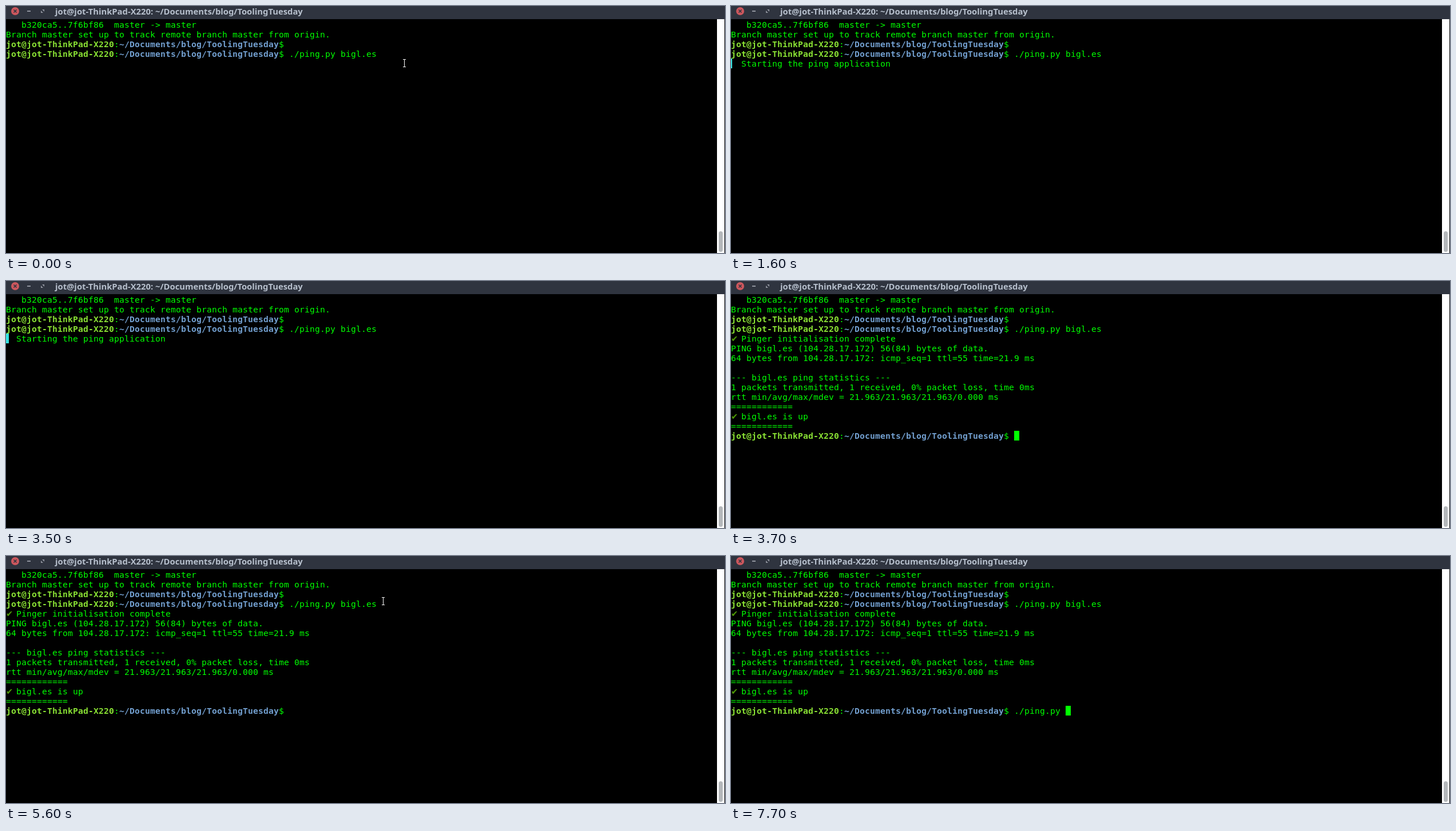
An HTML page with a canvas that plays this animation: 1257x432 px, repeating every 8 s.

```html
<!DOCTYPE html>
<html lang="en">
<head>
<meta charset="utf-8">
<title>Terminal</title>
<style>
  html, body { margin: 0; width: 100%; height: 100%; overflow: hidden; background: #000; }
  canvas { display: block; }
</style>
</head>
<body>
<canvas width="1257" height="432"></canvas>
<script>
const ctx = document.querySelector('canvas').getContext('2d');
const COL = 9, ROW = 17, TOP = 24, LOOP = 8000;
const MONO = '14.67px "DejaVu Sans Mono", monospace';
const GREEN = '#00ff00', USER = '#8ae234', PATH = '#729fcf', CHECK = '#4e9a06', SPIN = '#34e2e2';
const HOST = 'jot@jot-ThinkPad-X220', DIR = '~/Documents/blog/ToolingTuesday';
const COMMAND = './ping.py bigl.es', INPUT_COL = 55;

const OUTPUT = [
  '  Pinger initialisation complete',
  'PING bigl.es (104.28.17.172) 56(84) bytes of data.',
  '64 bytes from 104.28.17.172: icmp_seq=1 ttl=55 time=21.9 ms',
  '',
  '--- bigl.es ping statistics ---',
  '1 packets transmitted, 1 received, 0% packet loss, time 0ms',
  'rtt min/avg/max/mdev = 21.963/21.963/21.963/0.000 ms',
  '============',
  '  bigl.es is up',
  '============'
];

function rect(x, y, w, h, color) {
  ctx.fillStyle = color;
  ctx.fillRect(x, y, w, h);
}

function shape(color, points) {
  ctx.fillStyle = color;
  ctx.beginPath();
  points.forEach(([x, y]) => ctx.lineTo(x, y));
  ctx.fill();
}

// Every character sits in its own terminal cell.
function print(row, col, text, color = GREEN, bold = false) {
  ctx.font = (bold ? 'bold ' : '') + MONO;
  ctx.fillStyle = color;
  [...text].forEach((ch, i) => ctx.fillText(ch, (col + i) * COL, TOP + row * ROW + 14));
}

function prompt(row, input = '') {
  print(row, 0, HOST, USER, true);
  print(row, 21, ':');
  print(row, 22, DIR, PATH, true);
  print(row, 53, '$ ' + input);
}

function block(row, col, width = COL, color = GREEN) {
  rect(col * COL, TOP + row * ROW, width, ROW, color);
}

function check(row) {
  ctx.font = '14.67px "DejaVu Sans", sans-serif';
  ctx.fillStyle = CHECK;
  ctx.fillText('✔', 0, TOP + row * ROW + 14);
}

function windowFrame() {
  rect(0, 0, 1257, 432, '#000');
  rect(0, 0, 1257, 23, '#2f343f');
  ctx.fillStyle = '#cc575d';
  ctx.beginPath();
  ctx.arc(16, 9, 7, 0, 7);
  ctx.fill();
  ctx.strokeStyle = '#2f343f';
  ctx.lineWidth = 1.6;
  ctx.beginPath();
  ctx.moveTo(13.5, 6.5); ctx.lineTo(18.5, 11.5);
  ctx.moveTo(18.5, 6.5); ctx.lineTo(13.5, 11.5);
  ctx.stroke();
  rect(37, 8, 6, 2, '#90949e');
  shape('#90949e', [[63, 6], [67, 6], [67, 10]]);
  shape('#90949e', [[61, 8], [61, 12], [65, 12]]);
  ctx.font = 'bold 14.8px "Noto Sans", "Open Sans", sans-serif';
  ctx.fillStyle = '#b6bfcc';
  ctx.fillText(`${HOST}: ${DIR}`, 86, 15);
  rect(1243, 23, 13, 409, '#fff');
  ctx.fillStyle = '#b4b7ba';
  ctx.beginPath();
  ctx.roundRect(1246, 394, 7, 36, 3.5);
  ctx.fill();
}

function pointer(x, y) {
  x = Math.round(x);
  y = Math.round(y);
  rect(x - 3, y - 8, 7, 3, '#000');
  rect(x - 3, y + 5, 7, 3, '#000');
  rect(x - 1, y - 7, 3, 14, '#000');
  rect(x - 2, y - 7, 5, 1, '#fff');
  rect(x - 2, y + 6, 5, 1, '#fff');
  rect(x, y - 7, 1, 14, '#fff');
}

function glide(t, start, [x0, y0], [x1, y1]) {
  const p = Math.min(1, (t - start) / 400), e = p * p * (3 - 2 * p);
  pointer(x0 + (x1 - x0) * e, y0 + (y1 - y0) * e);
}

function startup(t) {
  if (t < 1400) {
    if (t >= 500 && t < 1100) block(3, 72);
    pointer(696, 100);
  } else if (t < 1500) {
    block(4, 0);
  } else {
    // The bar grows from 1 to 7 pixels and shrinks again, one step per 120 ms.
    const step = Math.floor((t - 1480) / 120) % 12;
    block(4, 0, 7 - Math.abs(6 - step), SPIN);
    print(4, 2, 'Starting the ping application');
  }
}

function results(t) {
  OUTPUT.forEach((line, i) => print(4 + i, 0, line));
  check(4);
  check(12);

  const erased = t < 7300 ? 0 : t < 7600 ? 1 : t < 7700 ? 4 : 7;
  const input = t < 6300 ? '' : COMMAND.slice(0, COMMAND.length - erased);
  prompt(14, input);
  const lit = t < 6300 ? Math.floor((t - 3700) / 600) % 2 === 0 : t < 6800 || t >= 7300;
  if (lit) block(14, INPUT_COL + input.length);

  if (t >= 4700 && t < 5200) glide(t, 4700, [697, 98], [675, 23]);
  else if (t >= 5200 && t < 6200) glide(t, 5200, [675, 23], [659, 79]);
}

function draw() {
  // The screen refreshes ten times a second.
  const t = Math.floor(performance.now() % LOOP / 100) * 100;
  windowFrame();
  print(0, 3, 'b320ca5..7f6bf86  master -> master');
  print(1, 0, 'Branch master set up to track remote branch master from origin.');
  prompt(2);
  prompt(3, COMMAND);
  (t < 3700 ? startup : results)(t);
  requestAnimationFrame(draw);
}
draw();
</script>
</body>
</html>
```
